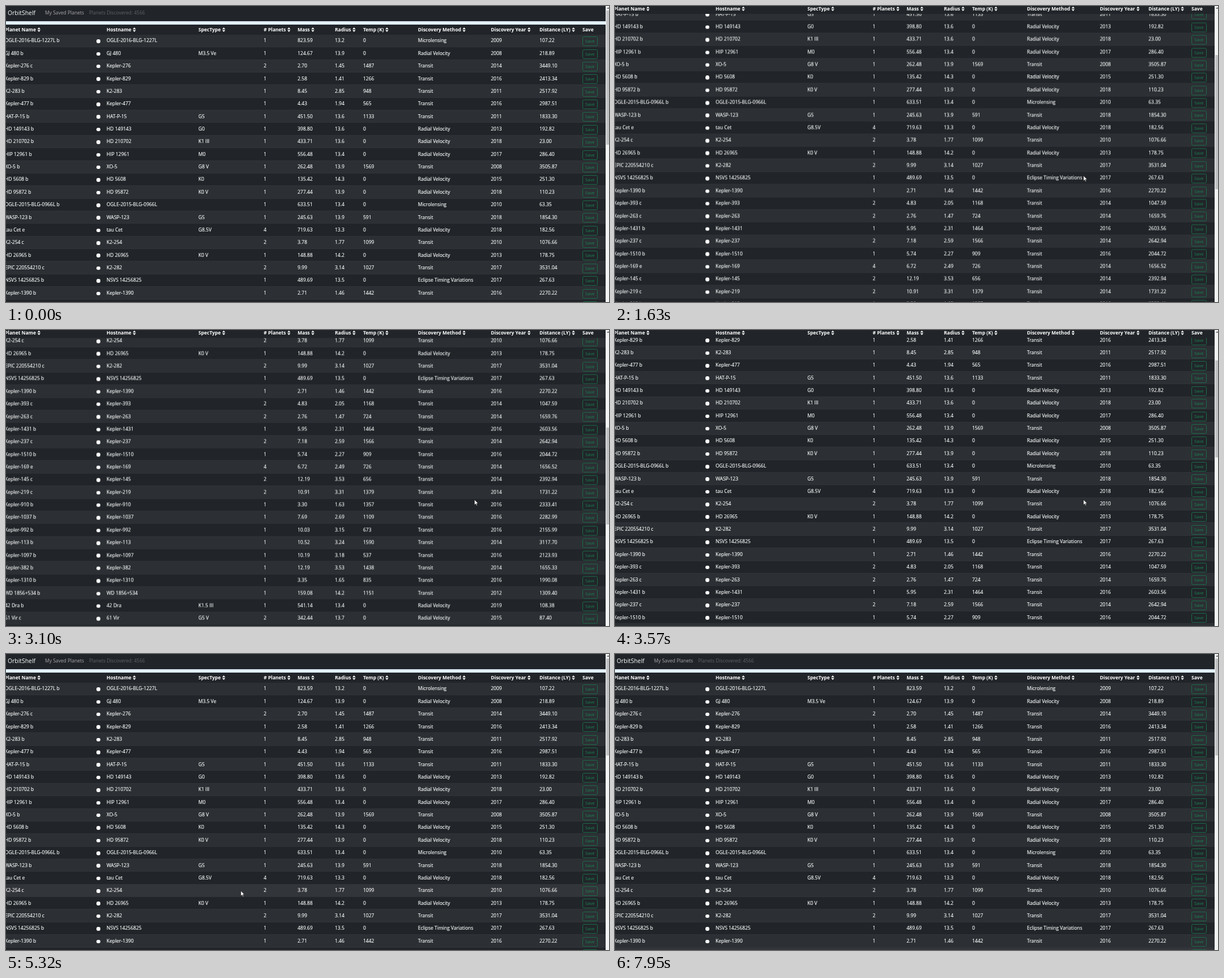
Recreate the animation shown at these times as an HTML page. Size 1067 by 525 pixels, loop 8020 ms.

```html
<!DOCTYPE html>
<html lang="en">
<head>
<meta charset="utf-8">
<title>Planet table</title>
<style>
html, body { margin: 0; width: 100%; height: 100%; overflow: hidden; background: #212529; }
#stage { position: relative; width: 1067px; height: 525px; overflow: hidden; color: #fff;
  font: 8.5px/14px "Open Sans", "Noto Sans", sans-serif; white-space: nowrap; }
#stage div, #stage span, #stage i { position: absolute; box-sizing: border-box; }
#page, #head { left: 0; top: 0; width: 1060.5px; will-change: transform; }
#nav { left: 0; top: 0; width: 100%; height: 27px; background: #212529; }
#nav span { top: 5px; }
#nav .brand { left: 3px; font-size: 10.4px; }
#nav .saved { left: 69px; color: #a9a5ac; }
#nav .count { left: 147px; color: #606468; }
#strip { left: 0; top: 27px; width: 100%; height: 6px; background: #e1effa; }
#rule { left: 0; top: 50px; width: 100%; height: 1px; background: #e4e5e6; }
#head { height: 18px; background: #212529; font-weight: 700; }
#head span { top: 2px; }
#head span:not(:last-child)::after { content: ""; display: inline-block; width: 5.6px; height: 8px;
  margin-left: 2.5px; vertical-align: -1px; background: #fff;
  clip-path: polygon(50% 0, 100% 42%, 0 42%, 50% 0, 50% 100%, 0 58%, 100% 58%, 50% 100%); }
.row { left: 0; width: 100%; height: 22.4px; background: #212529; border-bottom: 1px solid #30343a; }
.row.odd { background: #2c3034; }
.row.hover { background: #323539; }
.row span { top: 3.6px; -webkit-text-stroke: .15px #fff; }
.row i { left: 160px; top: 8.4px; width: 6.5px; height: 6.5px; border-radius: 50%; background: #fff; }
.row .save { left: 1020px; top: 3.4px; width: 26.5px; height: 17px; border: 1px solid #1b6c48;
  border-radius: 2.5px; color: #198754; font-size: 7.5px; line-height: 15.4px; text-align: center; }
#bar { left: 1060.5px; top: 0; width: 7px; height: 525px; background: #f3f4f4; }
#bar i { left: 2.5px; top: 2px; width: 5px; height: 3px; background: #777;
  clip-path: polygon(50% 0, 100% 100%, 0 100%); }
#thumb { left: 1px; width: 6px; background: #c2c3c4; }
#cursor { position: absolute; left: 0; top: 0; overflow: visible; }
</style>
</head>
<body>
<div id="stage">
  <div id="page">
    <div id="nav"><span class="brand">OrbitShelf</span><span class="saved">My Saved Planets</span><span class="count">Planets Discovered: 4566</span></div>
    <div id="strip"></div>
  </div>
  <div id="head"></div>
  <div id="bar"><i></i><div id="thumb"></div></div>
  <svg id="cursor" width="8" height="12"><path d="M0 0V9.2L2.2 7.2L3.7 10.6L5.1 10L3.6 6.7H6.5Z" fill="#fff" stroke="#111" stroke-width=".6"/></svg>
</div>
<script>
const LOOP = 8020, TICK = 67, ROW_TOP = 50.8, ROW_H = 22.37;
const columns = [-2, 178, 340.5, 456, 516, 582, 632, 729, 858, 944, 1020];
const titles = ['Planet Name', 'Hostname', 'SpecType', '# Planets', 'Mass', 'Radius', 'Temp (K)',
  'Discovery Method', 'Discovery Year', 'Distance (LY)', 'Save'];

// name[=host][|spectral type]
const planets = `OGLE-2016-BLG-1227L b, GJ 480 b|M3.5 Ve, Kepler-276 c, Kepler-829 b, K2-283 b,
Kepler-477 b, HAT-P-15 b|G5, HD 149143 b|G0, HD 210702 b|K1 III, HIP 12961 b|M0, XO-5 b|G8 V,
HD 5608 b|K0, HD 95872 b|K0 V, OGLE-2015-BLG-0966L b, WASP-123 b|G5, tau Cet e|G8.5V, K2-254 c,
HD 26965 b|K0 V, EPIC 220554210 c=K2-282, NSVS 14256825 b, Kepler-1390 b, Kepler-393 c,
Kepler-263 c, Kepler-1431 b, Kepler-237 c, Kepler-1510 b, Kepler-169 e, Kepler-145 c,
Kepler-219 c, Kepler-910 b, Kepler-1037 b, Kepler-992 b, Kepler-113 b, Kepler-1097 b,
Kepler-382 b, Kepler-1310 b, WD 1856+534 b, 42 Dra b|K1.5 III, 61 Vir c|G5 V, 70 Vir b|G5V,
Kepler-255 c, K2-60 b|G4 V, Kepler-52 c|M0 V, Kepler-248 b, 24 Sex b|K0 IV, Kepler-1102 b,
Kepler-341 d, HD 4313 b|G5, Kepler-722 c, Kepler-1204 b`.split(/,\s/);

const $ = id => document.getElementById(id);
const add = (parent, tag, text = '', className = '') => {
  const el = document.createElement(tag);
  el.textContent = text;
  el.className = className;
  return parent.appendChild(el);
};
const addCells = (parent, texts) => texts.forEach((text, i) => {
  add(parent, 'span', text).style.left = columns[i] + 'px';
});

const random = seed => {
  const x = Math.sin(seed * 12.9898) * 43758.5453;
  return x - Math.floor(x);
};

const methodOf = name =>
  name.startsWith('OGLE') ? 'Microlensing' :
  name.startsWith('NSVS') ? 'Eclipse Timing Variations' :
  /^(Kepler|K2|HAT|XO|WASP|EPIC|WD)/.test(name) ? 'Transit' : 'Radial Velocity';

// Mass-radius power laws for rocky, Neptune-like and giant planets.
const radiusOf = mass =>
  mass < 2.04 ? 1.008 * mass ** 0.279 :
  mass < 130 ? 0.808 * mass ** 0.59 : 17.74 * mass ** -0.044;

function describe(entry, index) {
  const [label, spec = ''] = entry.split('|');
  const [name, host = name.slice(0, -2)] = label.split('=');
  const between = (low, high, salt) => low + (high - low) * random(index + 1 + salt * 61);
  const method = methodOf(name), transit = method === 'Transit';
  const kepler = name.startsWith('Kepler');
  const small = kepler || /^(K2|EPIC)/.test(name);
  const mass = small ? between(1.7, 13, 1) : between(110, 990, 1);
  const year = kepler ? (parseInt(name.slice(7)) > 400 ? 2016 : 2014) : between(2008, 2020, 2);
  return [
    name, host, spec,
    name.charCodeAt(name.length - 1) - 'a'.charCodeAt(0),
    mass.toFixed(2),
    +radiusOf(mass).toPrecision(3),
    transit ? Math.round(between(400, 1600, 3)) : 0,
    method,
    Math.round(year),
    (transit ? between(1000, 3600, 4) : between(11, 290, 4)).toFixed(2)
  ];
}

addCells($('head'), titles);
const rows = planets.map((entry, i) => {
  const row = add($('page'), 'div', '', i % 2 ? 'row' : 'row odd');
  row.style.top = ROW_TOP + i * ROW_H + 'px';
  addCells(row, describe(entry, i));
  add(row, 'i');
  add(row, 'div', 'Save', 'save');
  return row;
});
add($('page'), 'div').id = 'rule';

// Moves advance one step per tick.
const scrolls = [
  { start: 1420, steps: 6, from: 0, to: 222 },
  { start: 1960, steps: 5, from: 222, to: 398 },
  { start: 2420, steps: 5, from: 398, to: 614 },
  { start: 2960, steps: 10, from: 614, to: 111 },
  { start: 3830, steps: 4, from: 111, to: 0 }
];
const moves = [
  { start: 530, steps: 3, from: [1035, 524], via: [1036, 518], to: [1041, 516] },
  { start: 800, steps: 7, from: [1041, 516], via: [910, 450], to: [829, 301] },
  { start: 4240, steps: 11, from: [829, 301], via: [600, -55], to: [413, 421] },
  { start: 5320, steps: 1, from: [413, 421], via: [414, 420], to: [415.5, 420] },
  { start: 6930, steps: 12, from: [415.5, 420], via: [760, 425], to: [1040, 524.3] }
];
const currentOf = (list, t) => list.findLast(move => move.start <= t);
const progress = (move, t) => Math.min(1, (Math.floor((t - move.start) / TICK) + 1) / move.steps);

function scrollAt(t) {
  const move = currentOf(scrolls, t);
  if (!move) return 0;
  const eased = 1 - (1 - progress(move, t)) ** 1.55;
  return move.from + (move.to - move.from) * eased;
}

function cursorAt(t) {
  const move = currentOf(moves, t);
  if (!move) return [1041, 530];
  const p = progress(move, t), u = p * p * (3 - 2 * p), v = 1 - u;
  return move.from.map((a, i) => v * v * a + 2 * u * v * move.via[i] + u * u * move.to[i]);
}

let hovered;
function draw() {
  const t = performance.now() % LOOP;
  const scroll = scrollAt(t), [x, y] = cursorAt(t);
  $('page').style.transform = `translateY(${-scroll}px)`;
  $('head').style.transform = `translateY(${Math.max(-4, 33 - scroll)}px)`;
  $('cursor').style.transform = `translate(${x}px, ${y}px)`;

  // Loading more rows shortens the thumb.
  const loaded = t >= 2640;
  $('thumb').style.top = 8 + scroll * (loaded ? 0.4125 : 0.433) + 'px';
  $('thumb').style.height = (loaded ? 172 : 238) + 'px';

  const pointing = t >= 800 && t < 1420 || t >= 4240;
  const next = pointing ? rows[Math.floor((y + scroll - ROW_TOP) / ROW_H)] : undefined;
  if (next !== hovered) {
    hovered?.classList.remove('hover');
    next?.classList.add('hover');
    hovered = next;
  }
  requestAnimationFrame(draw);
}
draw();
</script>
</body>
</html>
```
